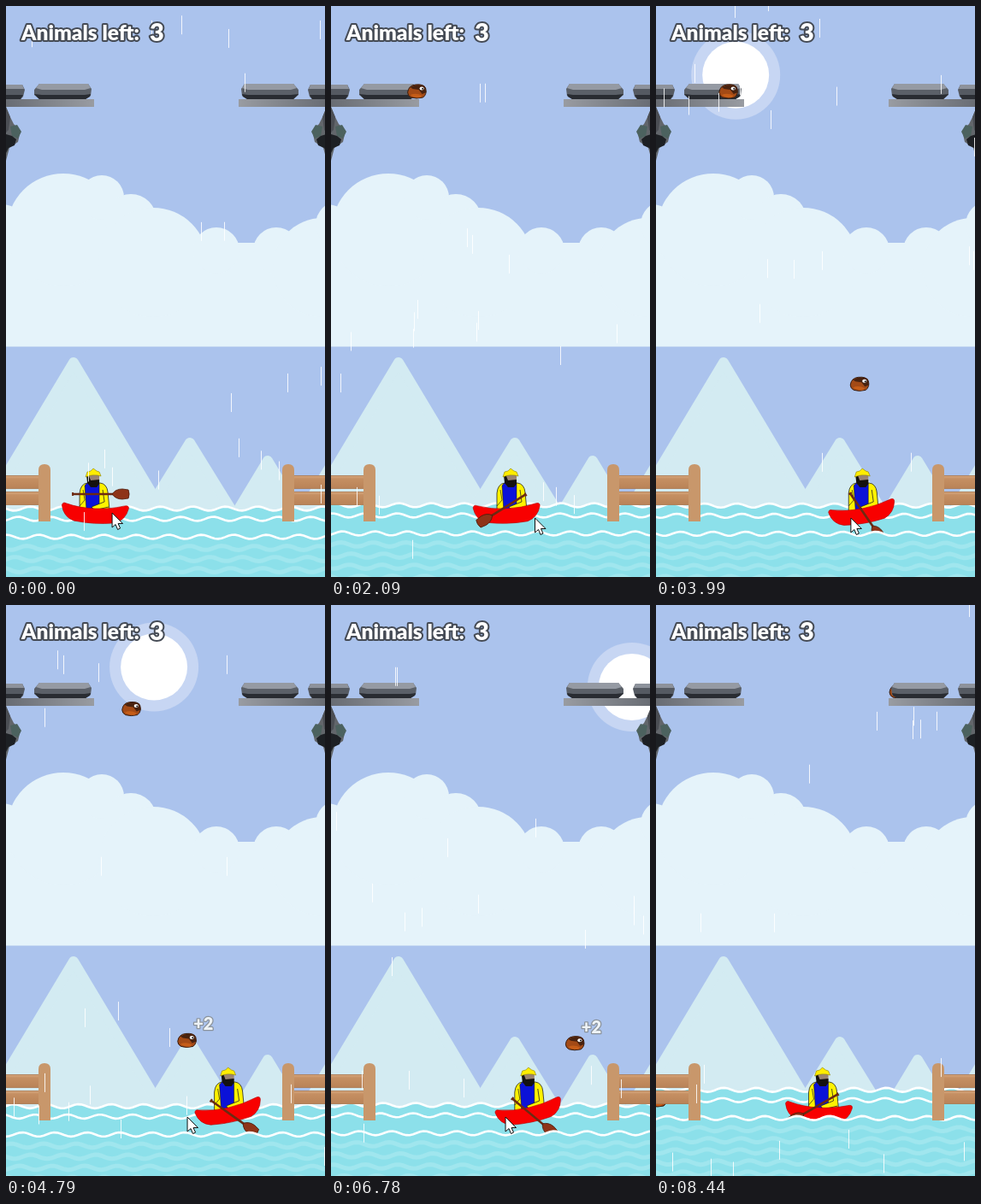
These frames come from a looping animation (373x668 px, 8.5 s). An HTML page:

```html
<!DOCTYPE html>
<html lang="en">
<head>
<meta charset="utf-8">
<title>Canoe rescue</title>
<style>
html, body { margin: 0; width: 100%; height: 100%; overflow: hidden; background: #abc3ed; }
svg { display: block; width: 100vw; height: 100vh; }
text { font-family: Lato, "Open Sans", sans-serif; font-weight: 900; fill: #fff; stroke: #454b55; paint-order: stroke; stroke-linejoin: round; }
.title { font-size: 24.5px; stroke-width: 4px; }
.count { font-size: 29px; }
.score { font-size: 20px; fill: #eef3f6; stroke: #8b939c; stroke-width: 2.5px; text-anchor: middle; }
.peaks path { fill: #d3ebf2; stroke: #d3ebf2; stroke-width: 12; stroke-linejoin: round; }
.crest { fill: #8ce0ea; stroke: #fff; stroke-width: 2.6; }
.stripe { fill: none; stroke: #a0e6ee; stroke-width: 5; }
#rain line { stroke: #fff; stroke-opacity: .85; }
</style>
</head>
<body>
<svg viewBox="0 0 373 668" preserveAspectRatio="none">
  <defs>
    <linearGradient id="slab"><stop stop-color="#686c73"/><stop offset="1" stop-color="#999ca2"/></linearGradient>
    <linearGradient id="wood" x2="0" y2="1"><stop stop-color="#d6a67c"/><stop offset=".25" stop-color="#c58f62"/><stop offset="1" stop-color="#b98358"/></linearGradient>
    <g id="ledge">
      <path d="M0 118L5 130L9 138L17 146L14 159L4 166L0 181Z" fill="#62666b"/>
      <path d="M5 141L13 139L18 147L14 155L7 152Z" fill="#4c625f"/>
      <path d="M0 150L7 152L12 156L10 163L3 166L0 172Z" fill="#1d2024"/>
      <path d="M0 118L5 130L3 145L0 148Z" fill="#4b4e54"/>
      <rect y="109" width="103" height="9" fill="url(#slab)"/>
      <path d="M0 92H19L22 98L20 106L17 109H0Z" fill="#555a62"/>
      <path d="M0 92H19L21 97H0Z" fill="#8d929b"/>
      <path d="M0 104H20L17 109H0Z" fill="#2b2e34"/>
      <path d="M33 98L39 91H96L100 97L99 105L93 109H39L33 104Z" fill="#5b6068"/>
      <path d="M35 96L39 91H96L99 96L92 98H42Z" fill="#959aa3"/>
      <path d="M33 103L42 104H92L99 103L98 106L93 109H39Z" fill="#292c32"/>
    </g>
    <g id="critter">
      <path d="M-11 1Q-10-7-2-8Q8-9 10-4Q12 3 7 7Q-1 9-7 7Q-11 5-11 1Z" fill="#a34a16" stroke="#351d12"/>
      <path d="M-8-5Q0-10 9-6L11 1L6 3L2-2L-5-3Z" fill="#48220f"/>
      <path d="M-8 4Q-1 1 6 5L4 7Q-3 8-8 4Z" fill="#c55d18"/>
      <ellipse cx="5.500" cy="-3.500" rx="2.600" ry="2" fill="#fff"/>
      <circle cx="6.500" cy="-3.200" r="1" fill="#111"/>
    </g>
    <g id="fence">
      <rect x="-2" y="549.500" width="42" height="15" fill="url(#wood)" stroke="#a9754c" stroke-width=".8"/>
      <rect x="-2" y="568.500" width="42" height="15" fill="url(#wood)" stroke="#a9754c" stroke-width=".8"/>
      <path d="M38 603V543Q38 536 45 536Q52 536 52 543V603Z" fill="#c8976b"/>
    </g>
  </defs>

  <rect width="373" height="668" fill="#abc3ed"/>
  <g id="sun"><circle r="52" fill="#c7d6f3"/><circle r="39" fill="#fff"/></g>
  <g fill="#e5f3fa">
    <rect y="277" width="373" height="121.500"/>
    <circle cx="-5" cy="262" r="30"/><circle cx="67" cy="262" r="66"/>
    <circle cx="112" cy="224" r="26"/><circle cx="146" cy="250" r="30"/>
    <circle cx="172" cy="300" r="64"/><circle cx="246" cy="286" r="27"/>
    <circle cx="316" cy="286" r="27"/><circle cx="370" cy="306" r="58"/>
    <circle cx="390" cy="256" r="28"/>
  </g>
  <g class="peaks">
    <path d="M79 417L-30 599H188Z"/>
    <path d="M215 511L160 600H270Z"/>
    <path d="M306 532L265 600H347Z"/>
    <path d="M399 506L342 600H456Z"/>
  </g>
  <g id="backSea"></g>

  <g id="rower">
    <path d="M-18-25Q-17-36-9-37H6Q14-36 15-26L17-5L-18-3Z" fill="#fff200" stroke="#222" stroke-width=".8"/>
    <path d="M-12-34L-9-37H5V-4H-10Z" fill="#0b12d8" stroke="#111" stroke-width=".5"/>
    <path d="M9-29L11-15L-4-9L-1-5L16-9" fill="#fff200" stroke="#222" stroke-width=".8"/>
    <path d="M-14-29L-12-17L-18-10" fill="none" stroke="#222" stroke-width=".7"/>
    <path d="M-9-46H5V-37L0-34H-7Z" fill="#9b8471"/>
    <path d="M-10-46L-7-45L-5-40L5-41V-36L2-32H-5L-9-37Z" fill="#14110f"/>
    <path d="M-11-44L-9-50L-5-51L-2-54L2-51L5-50L7-45Q-2-48-11-44Z" fill="#ffed00" stroke="#8b8000" stroke-width=".6"/>
  </g>
  <path id="hull" d="M-39-9Q-38-13-34-11Q-18-6 0-6Q18-6 33-10Q40-12 39-7Q36 6 24 10Q0 13-24 9Q-37 5-39-9Z" fill="#f80000" stroke="#b90000" stroke-width=".6"/>
  <g id="paddle">
    <path d="M-33 0H16" stroke="#6c2a12" stroke-width="2.600"/>
    <path d="M-33-2V2" stroke="#6c2a12" stroke-width="2"/>
    <path d="M13 0Q17-6 25-6L32-5Q34 0 32 5L25 6Q17 6 13 0Z" fill="#8e3418" stroke="#4e1c0c" stroke-width=".8"/>
  </g>
  <g id="frontSea"></g>

  <use href="#ledge"/>
  <g id="late"><use href="#critter" x="284" y="101"/><use href="#critter" x="2" y="579"/></g>
  <use href="#ledge" transform="translate(375) scale(-1 1)"/>
  <g id="animals"></g>
  <use href="#fence"/>
  <use href="#fence" transform="translate(375) scale(-1 1)"/>
  <g id="rain"></g>
  <g id="scores"></g>
  <text class="title" x="18" y="39.500">Animals left:</text>
  <text class="title count" x="168" y="41">3</text>
  <path id="cursor" d="M0 0V17L4 13.500L6.500 19.500L9.500 18L7 12.500H12.500Z" fill="#fff" stroke="#111"/>
</svg>
<script>
const LOOP = 8500, W = 373, H = 668, WATERLINE = 537;
const $ = id => document.getElementById(id);
const clamp = (v, lo = 0, hi = 1) => Math.min(hi, Math.max(lo, v));
const ease = u => { u = clamp(u); return u * u * (3 - 2 * u); };
const rand = n => { const s = Math.sin(n * 127.1 + 11.7) * 43758.5453; return s - Math.floor(s); };

function add(parent, tag, attrs = {}) {
  const el = document.createElementNS("http://www.w3.org/2000/svg", tag);
  for (const k in attrs) el.setAttribute(k, attrs[k]);
  return parent.appendChild(el);
}
const place = (el, x, y, turn = 0) =>
  el.setAttribute("transform", `translate(${x} ${y}) rotate(${turn})`);
const show = (el, on) => el.setAttribute("visibility", on ? "visible" : "hidden");

// Steering: time, boat x, boat tilt, cursor x
const course = [[0, 104, 2, 124], [1050, 190, 3, 232], [3130, 221, -9, 245], [4790, 261, -13, 212],
  [5920, 221, -3, 270], [6780, 232, -13, 204], [8440, 197, 0, 240]];

function steer(t) {
  const i = clamp(course.findIndex(row => row[0] > t), 1, course.length - 1);
  const a = course[i - 1], b = course[i];
  const k = t > b[0] ? 1 : (t - a[0]) / (b[0] - a[0]);
  return a.map((v, n) => v + (b[n] - v) * k).slice(1);
}

const seaLift = t => 2.5 * (Math.cos(t * 2 * Math.PI / 5900) - 1) - 16 * ease((t - 6300) / 2140);

const waves = Array.from({ length: 8 }, (_, i) => ({
  y: i < 2 ? 588 + 12 * i : 621 + 13 * (i - 2),
  shift: i * 14,
  dir: i % 2 ? -1 : 1,
  crest: i < 3,
  el: add($(i < 2 ? "backSea" : "frontSea"), "path", { class: i < 3 ? "crest" : "stripe" })
}));

function wavePath(y, shift, closed) {
  let d = "";
  for (let x = -4; x <= W + 4; x += 4)
    d += `${d ? "L" : "M"}${x} ${(y + 2.4 * Math.sin((x + shift) * Math.PI / 19)).toFixed(2)}`;
  return closed ? d + "V740H-5Z" : d;
}

// Each animal walks off the ledge, falls, then bounces off the canoe towards one side
const EDGE = 1150, DROP = 1508, GRAVITY = 0.000158;
const HIT = DROP + Math.sqrt((WATERLINE - 118) / GRAVITY);
const alongX = age => 9 + 0.088 * Math.min(age, EDGE) + 0.0715 * Math.max(0, age - EDGE);

function critterAt(age, side) {
  const b = age - HIT;
  if (b > 0) {
    const s = b / 3300;
    return [alongX(HIT) + side * (0.05 * b + 0.000028 * b * b), WATERLINE - 184 * s * (1 - s)];
  }
  return [alongX(age), 100 + 0.05 * clamp(age - EDGE, 0, DROP - EDGE) + GRAVITY * Math.max(0, age - DROP) ** 2];
}

const animals = [{ start: 1050, side: -1 }, { start: 3130, side: 1 }];
for (const a of animals) {
  a.body = add($("animals"), "use", { href: "#critter" });
  a.score = add($("scores"), "text", { class: "score" });
  a.score.textContent = "+2";
}

const drops = Array.from({ length: 20 }, (_, i) => ({
  seed: i, start: rand(i + 500) * H, el: add($("rain"), "line", { y1: -11, y2: 11 })
}));

function drawBoat(t) {
  const [x, tilt, aim] = steer(t);
  // The blade works on the side away from the cursor
  const ready = ease(t / 450);
  const angle = ready * (93 + 58 * Math.tanh((aim - x) / 18));
  const swing = Math.cos(angle * Math.PI / 180);
  place($("rower"), x + 3.5 - 3.5 * swing, 595);
  place($("hull"), x, 594, tilt);
  place($("paddle"), x + 7 * swing, 594 + 6 * swing - 29 * (1 - ready), angle);
  place($("cursor"), aim, 599 - 6 * (1 - ready));
  show($("cursor"), t < 7950);
}

function draw(t) {
  const u = (t - 4790) / 1000;
  const sunX = 173 + 97 * u - 3.6 * u * u;
  place($("sun"), sunX, 72.3 + 0.0009 * (sunX - 190) ** 2);

  const lift = seaLift(t);
  for (const w of waves)
    w.el.setAttribute("d", wavePath(w.y + lift, w.shift + w.dir * t * 0.012, w.crest));

  drawBoat(t);

  for (const a of animals) {
    const age = t - a.start, b = age - HIT;
    const [x, y] = critterAt(age, a.side);
    place(a.body, x, y);
    place(a.score, x + 19, y - 12);
    a.score.setAttribute("opacity", b < 0 ? 0 : clamp(1.4 - b / 2000));
  }
  show($("late"), t > 8350);

  for (const d of drops) {
    const span = H + 40, fall = d.start + t * 0.6;
    const x = rand(d.seed + 31 * Math.floor(fall / span)) * W;
    place(d.el, Math.floor(x) + 0.5, fall % span - 20);
  }
}

const begin = performance.now();
function tick() {
  draw((performance.now() - begin) % LOOP);
  requestAnimationFrame(tick);
}
tick();
</script>
</body>
</html>
```
